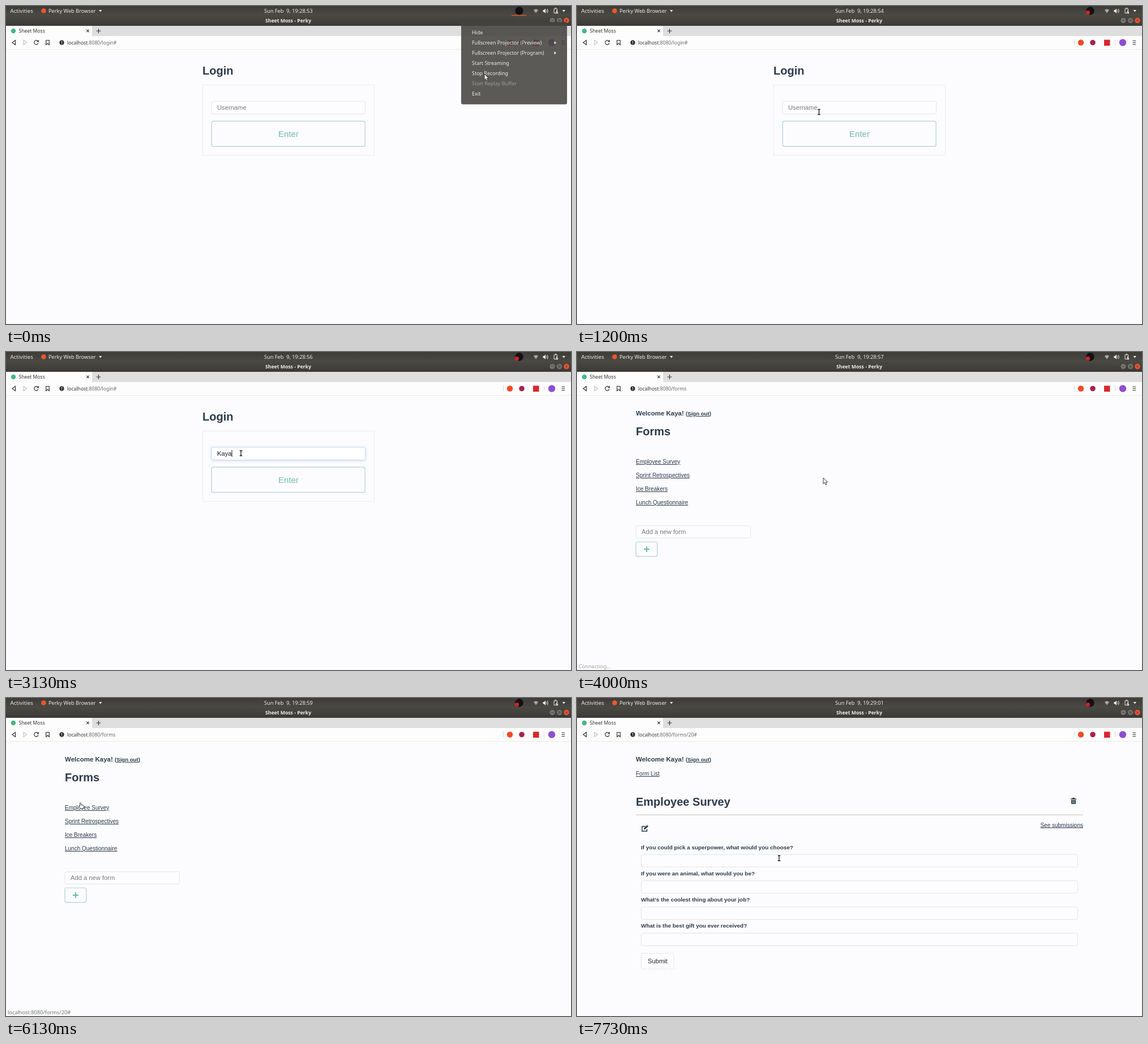
Animation, 998 px wide and 561 px high, one loop 8 s. Source, as an HTML page:

```html
<!DOCTYPE html>
<html lang="en">
<head>
<meta charset="utf-8">
<title>Form demo</title>
<style>
  html, body { margin: 0; width: 100%; height: 100%; overflow: hidden; background: #fcfcfe; }
  svg { display: block; width: 998px; height: 561px; }
  text { white-space: pre; }
  .ui { font: 9.2px "Noto Sans", "Open Sans", sans-serif; fill: #ecebe8; }
  .tool { font-size: 8.6px; fill: #333; }
  .page { font: 10px "Liberation Sans", Arial, sans-serif; fill: #2c3a4c; }
  .title { font-size: 20px; font-weight: bold; }
  .welcome { font-size: 11.5px; font-weight: bold; }
  .small { font-size: 9.65px; }
  .link { text-decoration: underline; }
  .label { font-size: 9.95px; font-weight: bold; }
  .field { font-size: 11.2px; }
  .hint { fill: #77777f; }
  .box { fill: #fdfdff; stroke: #e0e4ec; }
  .button { fill: #fcfcfe; stroke: #aed3d0; stroke-width: 1.2; }
  .focused { fill: #fff; stroke: #c6daee; filter: drop-shadow(0 1.5px 2.5px #d3daf2); }
  .line { fill: none; stroke: #333; stroke-width: 1.2; }
</style>
</head>
<body>
<svg viewBox="0 0 998 561">
  <defs>
    <linearGradient id="panel" x2="0" y2="1">
      <stop stop-color="#3e3c38"/><stop offset="1" stop-color="#4c4a45"/>
    </linearGradient>
    <linearGradient id="bar" x2="0" y2="1">
      <stop stop-color="#494843"/><stop offset="1" stop-color="#3b3a37"/>
    </linearGradient>
  </defs>
  <rect width="998" height="561" fill="#fcfcfe"/>

  <g id="login" class="page">
    <text class="title" x="347" y="121">Login</text>
    <rect x="347.5" y="139.5" width="303" height="124" fill="none" stroke="#ebecf1"/>
    <rect id="userBox" class="box" x="363" y="168" width="271.5" height="22.5" rx="3"/>
    <text id="user" class="field" x="373" y="183"></text>
    <path id="caret" d="M0 173v12" stroke="#111"/>
    <rect class="button" x="363.2" y="203.2" width="271" height="44.5" rx="3"/>
    <text x="499" y="230.5" text-anchor="middle" font-size="15" fill="#74b9ad">Enter</text>
  </g>

  <g id="forms" class="page">
    <text class="welcome" x="104" y="112">Welcome Kaya! <tspan class="small">(<tspan class="link">Sign out</tspan>)</tspan></text>
    <text class="title" x="104" y="147">Forms</text>
    <g class="link">
      <text x="104" y="197">Employee Survey</text>
      <text x="104" y="221">Sprint Retrospectives</text>
      <text x="104" y="245">Ice Breakers</text>
      <text x="104" y="269">Lunch Questionnaire</text>
    </g>
    <rect class="box" x="104" y="306.5" width="202.5" height="21.5" rx="3"/>
    <text class="field hint" x="114" y="321">Add a new form</text>
    <rect class="button" x="104" y="335" width="37.8" height="25.6" rx="3"/>
    <path d="M118 347.8h10m-5-5v10" stroke="#6fbfa3" stroke-width="2.2"/>
  </g>

  <g id="survey" class="page">
    <text class="welcome" x="104" y="112">Welcome Kaya! <tspan class="small">(<tspan class="link">Sign out</tspan>)</tspan></text>
    <text class="link" x="104" y="137">Form List</text>
    <text class="title" x="104" y="190">Employee Survey</text>
    <path d="M872 177.5h10v1.5h-10zM875 176h4v1.5h-4zM872.8 180h8.4l-.5 7h-7.4z"/>
    <path d="M875.3 181v5m1.7-5v5m1.7-5v5" stroke="#fcfcfe" stroke-width=".6"/>
    <path d="M104 206.2h790" stroke="#c3c5b8"/>
    <path d="M121 226.5h-6v8.5h8.5v-4" fill="none" stroke="#2c3a4c" stroke-width="1.4"/>
    <path d="M118 232l.5-2.5 5.500-5.300 2 2-5.500 5.300z"/>
    <text class="link" x="894" y="227.5" text-anchor="end">See submissions</text>
    <g id="questions"></g>
    <rect x="113.5" y="450.5" width="57.5" height="27.5" rx="2" fill="#fdfdff" stroke="#ccd0e4" stroke-dasharray="2 2"/>
    <text class="field" x="125" y="468" fill="#222">Submit</text>
  </g>

  <text id="status" class="ui" x="3" y="557.5" style="fill:#70776a"></text>

  <g class="ui">
    <rect width="998" height="18" fill="url(#panel)"/>
    <rect y="17" width="998" height="18" fill="url(#bar)"/>
    <text x="7.5" y="11.7" font-size="9.7">Activities</text>
    <circle cx="66.5" cy="8.5" r="4.3" fill="#f1562b"/>
    <text x="75" y="11.7">Perky Web Browser</text>
    <path d="M164 7h5.5l-2.75 3.5zM982.5 7h5.5l-2.75 3.5z"/>
    <text id="clock" x="456" y="11.7"></text>
    <text x="498.5" y="29" text-anchor="middle" font-weight="bold" font-size="8.7">Sheet Moss - Perky</text>
    <circle cx="906.5" cy="8.5" r="7.2" fill="#111116"/>
    <circle id="recording" cx="902.5" cy="11.5" r="3.6" fill="#d81f26"/>
    <path d="M932 7a6 6 0 0 1 8 0l-4 5.5z" fill="#aaa9a6"/>
    <path d="M948.5 7h2l2.5-2.5v8.5l-2.5-2.5h-2z"/>
    <path d="M954.5 6.5q1.5 2 0 4.5m1.7-6q2.6 3.5 0 7.5" fill="none" stroke="#ecebe8" stroke-width=".9"/>
    <path d="M968 5h5.5v7.5h-5.5zM969.5 3.5h2.5M973 8l-1.5 3h3.5l-1.5 3" fill="none" stroke="#ecebe8"/>
    <circle cx="965" cy="25.5" r="4.6" fill="#77756e"/>
    <circle cx="977.5" cy="25.5" r="4.6" fill="#77756e"/>
    <circle cx="990" cy="25.5" r="4.8" fill="#e9542f"/>
    <path d="M963 25.5h4M976 24h3v3h-3zM988.3 23.8l3.4 3.4m0-3.4l-3.4 3.4" fill="none" stroke="#33322f" stroke-width=".8"/>
  </g>

  <g class="ui tool">
    <rect y="35" width="998" height="18" fill="#dededf"/>
    <path d="M0 35h150q2 0 2 2v16h846v23.5H0z" fill="#fdfdfd"/>
    <path d="M0 76.5h998" stroke="#ebebdc"/>
    <circle cx="13" cy="44" r="4.2" fill="#41b883"/>
    <text x="22.5" y="47.2">Sheet Moss</text>
    <path class="line" d="M142.3 41.7l4.4 4.4m0-4.4l-4.4 4.4M159.5 44h8m-4-4v8"/>
    <path class="line" d="M16.5 60.5v8l-5.5-4z"/>
    <path class="line" d="M31 60.5v8l5.5-4z" style="stroke:#c4c4c8"/>
    <path class="line" d="M56.7 62.5a3.7 3.7 0 1 0 .3 3M57.3 60v3h-3M70.7 60.5h5.6v8l-2.8-2.5-2.8 2.5z"/>
    <circle cx="98.5" cy="64.5" r="4.2"/>
    <path d="M98.5 62v3m0 1v1" stroke="#fff"/>
    <text x="108" y="67.6">localhost<tspan id="path" fill="#686868"></tspan></text>
    <path d="M878.5 59v10M950.5 59v10" stroke="#d6d6dc"/>
    <circle cx="890" cy="64.5" r="5.2" fill="#ef4a27"/>
    <circle cx="911" cy="64.5" r="4.8" fill="#a82150"/>
    <rect x="931" y="59.5" width="10.5" height="10.5" fill="#d7282f"/>
    <circle cx="964" cy="64.5" r="6.2" fill="#8c4fd0"/>
    <path class="line" d="M981.5 61.5h5.5m-5.5 3h5.5m-5.5 3h5.5"/>
  </g>

  <g id="menu" class="ui">
    <path d="M893 16.5h26" stroke="#e95420" stroke-width="1.5"/>
    <path d="M807 28h93l6.5-6 6.5 6h75q3 0 3 3v139.5q0 3-3 3h-181q-3 0-3-3V31q0-3 3-3z" fill="#45443f" opacity=".88"/>
    <path d="M968.5 62l3.5 2.7-3.5 2.7zM968.5 80l3.5 2.7-3.5 2.7z"/>
  </g>

  <g id="cursor">
    <path id="arrow" d="M0 0v10.5l2.4-2.2 1.7 3.9 1.9-.8-1.7-3.8h3.3z" fill="#fff" stroke="#2a2a2a" stroke-width=".9"/>
    <g id="beam" fill="none">
      <path d="M-2.5-4.5h5M0-4.5v9M-2.5 4.5h5" stroke="#fff" stroke-width="3"/>
      <path d="M-2.3-4.5h4.6M0-4.5v9M-2.3 4.5h4.6" stroke="#222" stroke-width="1.4"/>
    </g>
    <path id="hand" d="M-2.5-4.5q1-1.3 2 0v3l4 .8q1.5.5 1.3 2l-.8 4h-5.5l-3-4q.2-1.5 2 0z" fill="#fff" stroke="#2a2a2a" stroke-width=".9"/>
  </g>
</svg>

<script>
const LOOP = 8000;
const NAME = 'Kaya';
const KEY_TIMES = [2400, 2560, 2720, 2900];
const FOCUS = 1800;
// Page changes: leave start, enter start, enter end
const TO_FORMS = [3450, 3560, 3760];
const TO_SURVEY = [6330, 6440, 6640];
// time, x, y, pointer shape from this time on
const ROUTE = [
  [0, 845, 120, 'arrow'], [130, 845, 120, 'arrow'], [930, 742, 176, 'arrow'],
  [1080, 520, 186, 'beam'], [1200, 427.5, 187, 'beam'], [1400, 427.5, 187, 'beam'],
  [1730, 415, 178.5, 'beam'], [3140, 415, 178.5, 'beam'], [3280, 426, 200, 'arrow'],
  [3420, 435, 222, 'arrow'], [4600, 435, 222, 'arrow'], [5200, 137, 267, 'hand'],
  [5470, 137, 267, 'hand'], [6000, 133, 190, 'hand'], [6440, 133, 189, 'beam'],
  [6800, 133, 189, 'beam'], [7650, 357, 282.5, 'beam'], [LOOP, 357, 282.5, 'beam']
];

const el = id => document.getElementById(id);
const progress = (t, from, to) => Math.min(1, Math.max(0, (t - from) / (to - from)));
const between = (t, from, to) => t >= from && t < to;
const show = (id, visible) => el(id).setAttribute('visibility', visible ? 'visible' : 'hidden');

['If you could pick a superpower, what would you choose?',
 'If you were an animal, what would you be?',
 'What’s the coolest thing about your job?',
 'What is the best gift you ever received?'].forEach((question, i) => {
  const y = i * 46.3;
  el('questions').innerHTML +=
    `<text class="label" x="113" y="${266.5 + y}">${question}</text>
     <rect class="box" x="113.5" y="${276 + y}" width="771" height="22" rx="3"/>`;
});

['Hide', 'Fullscreen Projector (Preview)', 'Fullscreen Projector (Program)', 'Start Streaming',
 'Stop Recording', 'Start Replay Buffer', 'Exit'].forEach((item, i) => {
  const color = item.includes('Replay') ? '#9c9b98' : '#ecebe8';
  el('menu').innerHTML +=
    `<text x="823" y="${49.8 + i * 18.1}" style="font-size:8.95px;fill:${color}">${item}</text>`;
});

function drawPage(id, t, enter, leave) {
  const shown = enter ? progress(t, enter[1], enter[2]) : 1;
  const gone = leave ? progress(t, leave[0], leave[1]) : 0;
  el(id).setAttribute('opacity', shown * (1 - gone));
  el(id).setAttribute('transform', `translate(0 ${30 * (1 - shown)})`);
}

function drawInput(t) {
  const focused = t >= FOCUS;
  const typed = NAME.slice(0, KEY_TIMES.filter(time => t >= time).length);
  const user = el('user');
  user.textContent = typed || 'Username';
  user.style.fill = typed ? '#1c1c28' : '#77777f';
  el('userBox').setAttribute('class', focused ? 'box focused' : 'box');
  const width = typed ? user.getComputedTextLength() : 0;
  el('caret').setAttribute('transform', `translate(${373.5 + width} 0)`);
  const lastKey = KEY_TIMES.filter(time => t >= time).pop() || FOCUS;
  show('caret', focused && (t - lastKey) % 1000 < 500);
}

function drawStatus(t) {
  const connecting = between(t, 3600, 4330);
  el('status').textContent = connecting ? 'Connecting…' : 'localhost:8080/forms/20#';
  const opacity = connecting ? 1 - progress(t, 3850, 4300)
    : progress(t, 5600, 5750) * (1 - progress(t, 6850, 7050));
  el('status').setAttribute('opacity', opacity);
}

function drawCursor(t) {
  const i = ROUTE.findIndex(stop => stop[0] > t) - 1;
  const [from, x, y, shape] = ROUTE[i];
  const [to, nextX, nextY] = ROUTE[i + 1];
  const p = progress(t, from, to);
  const ease = p * p * (3 - 2 * p);
  el('cursor').setAttribute('transform',
    `translate(${x + (nextX - x) * ease} ${y + (nextY - y) * ease})`);
  for (const id of ['arrow', 'beam', 'hand']) show(id, id === shape);
}

function draw(now) {
  const t = now % LOOP;
  const seconds = 53 + Math.floor((t + 330) / 1000);
  const pad = n => String(n).padStart(2, '0');
  el('clock').textContent = `Sun Feb  9, 19:${28 + Math.floor(seconds / 60)}:${pad(seconds % 60)}`;
  el('path').textContent = ':8080/' +
    (t < TO_FORMS[1] ? 'login#' : t < TO_SURVEY[1] ? 'forms' : 'forms/20#');
  el('menu').setAttribute('opacity', 1 - progress(t, 70, 300));
  show('recording', t >= 200);
  drawPage('login', t, null, TO_FORMS);
  drawPage('forms', t, TO_FORMS, TO_SURVEY);
  drawPage('survey', t, TO_SURVEY, null);
  drawInput(t);
  drawStatus(t);
  drawCursor(t);
  requestAnimationFrame(draw);
}
requestAnimationFrame(draw);
</script>
</body>
</html>
```
